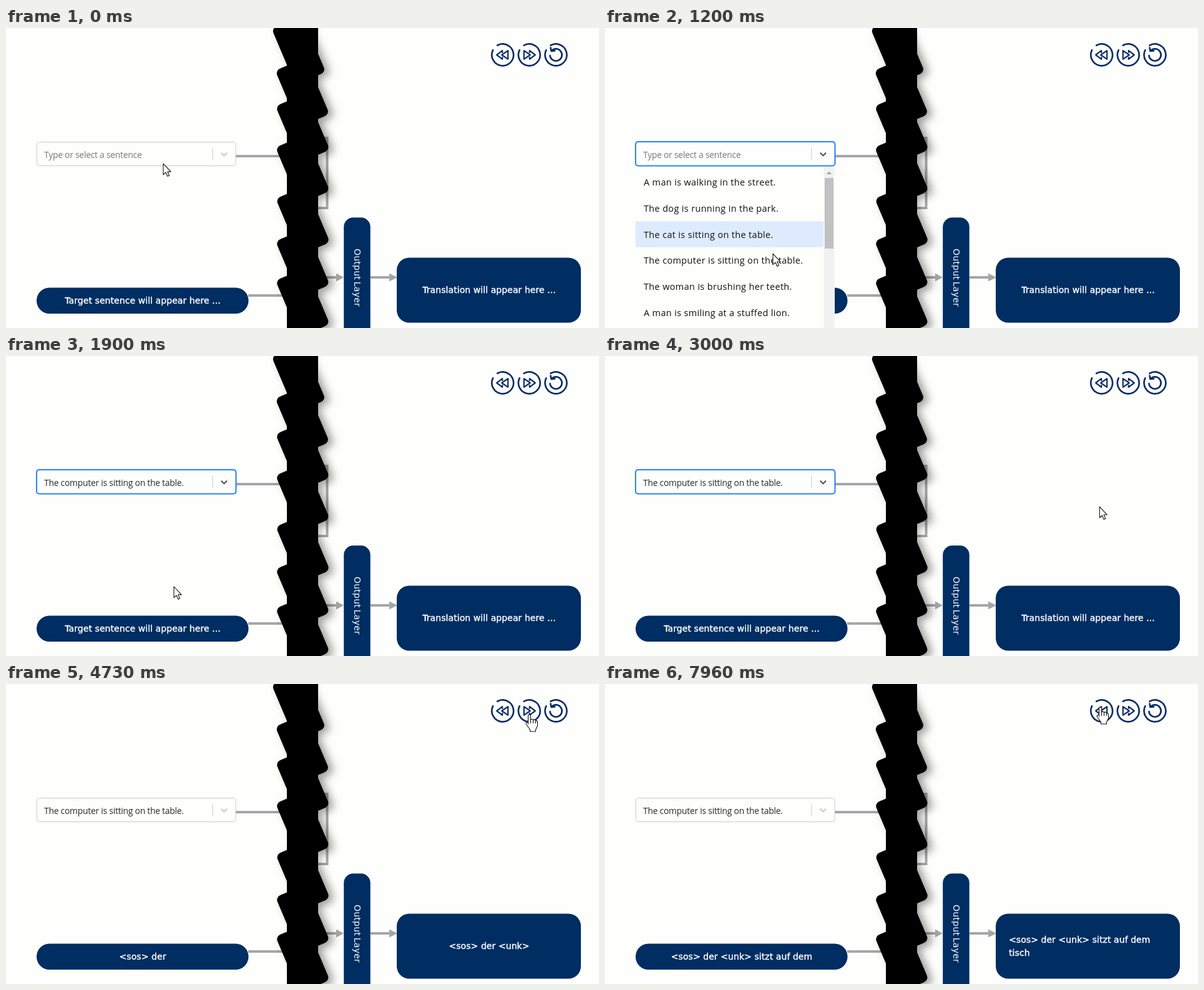
An HTML page for the animation above (8 s loop, 950 px wide and 480 px high).

```html
<!DOCTYPE html>
<html lang="en">
<head>
<meta charset="utf-8">
<style>
  html, body { margin: 0; width: 100%; height: 100%; overflow: hidden; background: #fefefd; }
  svg { display: block; }
  text { white-space: pre; font-kerning: none; }
  .ui { font: 13.9px "Open Sans", "Noto Sans", sans-serif; letter-spacing: -.25px; fill: #2a2a2a; }
  .item { font-size: 14.5px; letter-spacing: .33px; fill: #111; }
  .box { fill: #002d62; }
  .label { font: 14px "DejaVu Sans", sans-serif; fill: #fff; }
  .side { letter-spacing: .25px; word-spacing: -2px; }
  .strong { letter-spacing: .07px; stroke: #fff; stroke-width: .4; }
  .wire { fill: none; stroke: #a6a6a8; stroke-width: 4; }
  .head { fill: #a6a6a8; }
  .icon { fill: none; stroke: #0a2f66; stroke-width: 2.7; stroke-linecap: round; stroke-linejoin: round; }
  .thin { stroke-width: 2.2; }
  .pointer { fill: #fff; stroke: #111; stroke-width: 1.1; stroke-linejoin: round; }
  #pieces { filter: drop-shadow(8px 4px 7px rgba(0, 0, 0, .38)); }
</style>
</head>
<body>
<svg width="950" height="480" viewBox="0 0 950 480">
  <path class="wire" d="M368 205H450M388 428H450M500 176H514.5V288H500M500 399H532M584 399H616"/>
  <path class="head" d="M529 392.5L541 399L529 405.5ZM614 392.5L627 399L614 405.5Z"/>

  <rect class="box" x="49" y="415.5" width="339.5" height="41.5" rx="20.5"/>
  <rect class="box" x="541.2" y="303.3" width="42.5" height="200" rx="15"/>
  <rect class="box" x="626" y="367.5" width="295" height="104" rx="20"/>
  <text class="label side" text-anchor="middle" transform="translate(558 399.5) rotate(90)">Output Layer</text>
  <text class="label strong" id="target" x="219" y="441" text-anchor="middle"></text>
  <text class="label strong" id="output" x="774" y="424" text-anchor="middle"></text>
  <text class="label strong" id="wrapped" x="647" y="435">tisch</text>

  <g class="icon">
    <g transform="translate(795.7 43)">
      <path d="M-8.5 -15.2A17.4 17.4 0 1 1 -15.6 -7.7"/>
      <path class="thin" d="M8.5 -6.8V6.8L-1.5 0ZM-.5 -4V-6.8L-9.5 0L-.5 6.8V4"/>
    </g>
    <g transform="translate(838.3 43)">
      <path d="M-8.5 -15.2A17.4 17.4 0 1 1 -15.6 -7.7"/>
      <path class="thin" d="M-8.5 -6.8V6.8L1.5 0ZM.5 -4V-6.8L9.5 0L.5 6.8V4"/>
    </g>
    <g transform="translate(881 43)">
      <path d="M-8.5 -15.2A17.4 17.4 0 1 1 -15.6 -7.7"/>
      <path d="M-7 -6.5A9.6 9.6 0 1 1 -9.5 1M-8.5 -11.5L-7.5 -6L-2 -6.5"/>
    </g>
  </g>

  <rect x="49.5" y="182.5" width="318.5" height="38" rx="4" fill="#fefefd" stroke="#ccc"/>
  <path d="M331 191V212" stroke="#ccc"/>
  <path id="chevron" d="M344.8 199.6L349.4 204.2L354 199.6" fill="none" stroke-width="2.3"/>
  <rect id="focus" x="49" y="182" width="319.5" height="38.5" rx="4" fill="none" stroke="#2684ff" stroke-width="2"/>
  <text class="ui" id="value" x="61" y="207.5"></text>

  <g id="menu">
    <rect x="49" y="222" width="319" height="260" fill="#fefefd"/>
    <rect id="lit" x="49" width="301" height="41.6"/>
    <rect x="350.5" y="222" width="17" height="260" fill="#f1f1f1"/>
    <rect x="352" y="240" width="14" height="113" fill="#c1c1c1"/>
    <path d="M355 234L359 229.5L363 234Z" fill="#a3a3a3"/>
  </g>

  <g class="pointer" id="pointer">
    <path id="arrow" d="M0 0V17.6L4 14L6.8 20.2L9.5 19L6.8 12.9H12Z"/>
    <g id="hand">
      <path d="M-2 15V2a2 2 0 0 1 4 0V9a2 2 0 0 1 4 .5a2 2 0 0 1 4 1a1.6 1.6 0 0 1 3 1V18l-3 6v3h-9v-3l-6-8.5c-1.5-2 1-4 3-2.5z"/>
      <path d="M2 9v5M6 10v4M10 11v3" fill="none"/>
    </g>
  </g>

  <g id="pieces"></g>
  <rect x="450" width="50" height="480"/>
</svg>
<script>
const $ = id => document.getElementById(id);
const NS = "http://www.w3.org/2000/svg";

function add(parent, tag, attrs, text = "") {
  const el = document.createElementNS(NS, tag);
  for (const key in attrs) el.setAttribute(key, attrs[key]);
  el.textContent = text;
  parent.append(el);
}

const PERIOD = 8000, OPEN = 360, PRESS = 1730, PICK = 1900, BLUR = 3930;
const ROW_TOP = 226, ROW_H = 41.6;
const sentences = [
  "A man is walking in the street.",
  "The dog is running in the park.",
  "The cat is sitting on the table.",
  "The computer is sitting on the table.",
  "The woman is brushing her teeth.",
  "A man is smiling at a stuffed lion."
];
sentences.forEach((s, i) =>
  add($("menu"), "text", { class: "ui item", x: 62, y: 252 + 41.8 * i }, s));

// Tilted pieces along the black strip
[[468.8, 35.5], [474.8, 103], [475.3, 160], [475.3, 226], [475.6, 308], [475.3, 376], [475.3, 439]]
  .forEach(([x, y]) => add($("pieces"), "rect", {
    x: -26.5, y: -49, width: 53, height: 98, rx: 8,
    transform: `translate(${x} ${y}) rotate(-23)`
  }));

// Decoding steps: each click feeds one more word back in
const words = ["<sos>", "der", "<unk>", "sitzt", "auf", "dem"];
const clicks = [BLUR, 4730, 5400, 6030, 6660, 7300];

// Pointer tip: time, x, y
const path = [
  [0, 252, 217], [780, 252, 217], [1200, 269, 361], [1320, 269, 373], [1530, 269, 369],
  [2300, 269, 369], [2360, 315, 369], [2430, 440, 369], [2700, 522, 347],
  [3000, 792, 241.5], [3150, 843, 185], [3300, 847, 115], [3500, 838.5, 53],
  [3560, 838.5, 49], [7800, 838.5, 49], [7960, 793.5, 37], [PERIOD, 793.5, 37]
];

function tipAt(t) {
  const i = Math.max(1, path.findIndex(p => p[0] >= t));
  const [t0, x0, y0] = path[i - 1], [t1, x1, y1] = path[i];
  const k = (t - t0) / (t1 - t0);
  return [x0 + (x1 - x0) * k, y0 + (y1 - y0) * k];
}

const clamp = v => Math.min(1, Math.max(0, v));
const show = (id, on) => $(id).style.display = on ? "" : "none";

function draw(t) {
  const focus = clamp((t - OPEN) / 100) - clamp((t - BLUR) / 100);
  const shade = 204 - 114 * focus;
  $("focus").style.opacity = focus;
  $("chevron").style.stroke = `rgb(${shade},${shade},${shade})`;

  const picked = t >= PICK;
  $("value").textContent = picked ? sentences[3] : "Type or select a sentence";
  $("value").style.fill = picked ? "" : "#787878";

  show("menu", t >= OPEN && !picked);
  const hover = Math.floor((tipAt(Math.max(0, t - 40))[1] - ROW_TOP) / ROW_H);
  $("lit").setAttribute("y", ROW_TOP + ROW_H * Math.max(0, hover));
  $("lit").setAttribute("fill", t >= PRESS ? "#b2d4ff" : "#deebff");

  const n = clicks.filter(c => t >= c).length;
  const wraps = n === words.length;
  $("target").textContent = n ? words.slice(0, n).join(" ") : "Target sentence will appear here ...";
  $("output").textContent = n ? words.slice(0, n + 1).join(" ") : "Translation will appear here ...";
  $("output").setAttribute("x", wraps ? 647 : 774);
  $("output").setAttribute("y", wraps ? 414 : 424);
  $("output").setAttribute("text-anchor", wraps ? "start" : "middle");
  show("wrapped", wraps);

  const [x, y] = tipAt(t);
  const overButton = x > 770 && y < 61;
  $("pointer").setAttribute("transform", `translate(${x} ${y})`);
  show("arrow", !overButton);
  show("hand", overButton);
}

const start = performance.now();
function frame() {
  draw((performance.now() - start) % PERIOD);
  requestAnimationFrame(frame);
}
frame();
</script>
</body>
</html>
```
